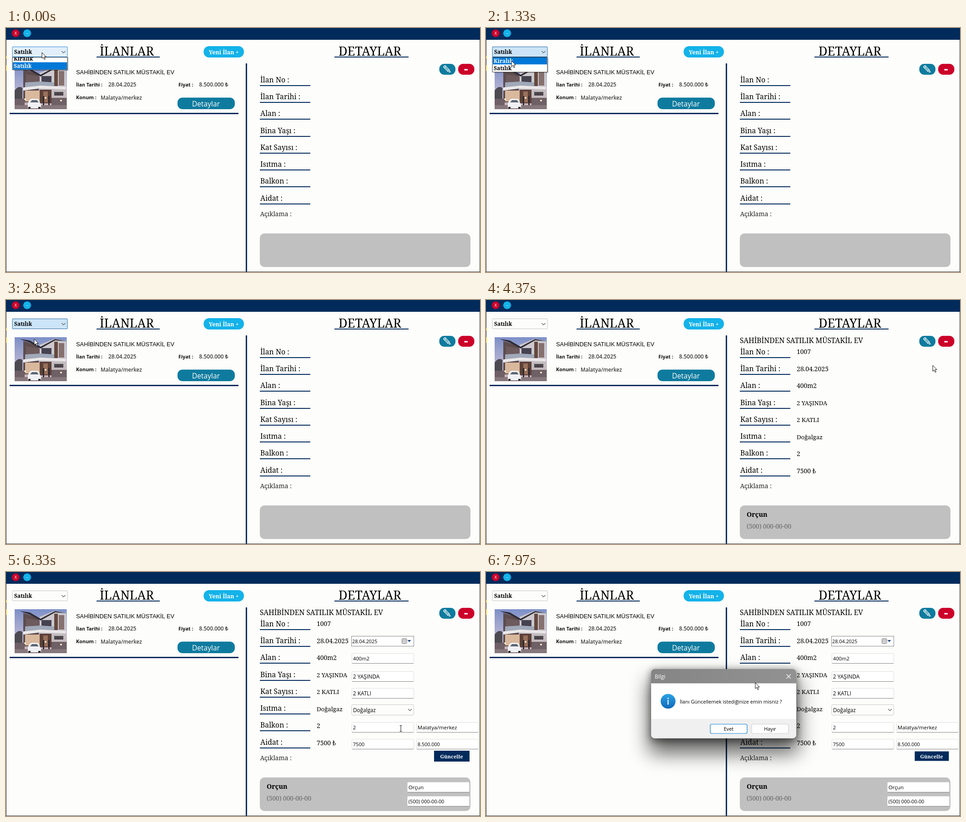
An HTML page for the animation above (8 s loop, 1042 px wide and 538 px high).

```html
<!DOCTYPE html>
<html lang="tr">
<head>
<meta charset="utf-8">
<title>İlanlar</title>
<style>
  html, body { margin: 0; width: 100%; height: 100%; overflow: hidden; background: #fdfdfb; }
  svg { display: block; }
  text { white-space: pre; }
  .serif { font-family: "Noto Serif", serif; }
  .sans { font-family: "Open Sans", "Noto Sans", sans-serif; }
  .arial { font-family: "Liberation Sans", Arial, sans-serif; }
</style>
</head>
<body>
<svg id="stage" width="1042" height="538" viewBox="0 0 1042 538" xmlns="http://www.w3.org/2000/svg">
  <defs>
    <linearGradient id="sky" x2="0" y2="1">
      <stop offset="0" stop-color="#7d90c8"/><stop offset=".6" stop-color="#b9b4d2"/><stop offset="1" stop-color="#d3b5ae"/>
    </linearGradient>
    <linearGradient id="info" x2="0" y2="1">
      <stop offset="0" stop-color="#2aa3e6"/><stop offset="1" stop-color="#0f68b8"/>
    </linearGradient>
    <linearGradient id="bar" x2="1" y2="0">
      <stop offset="0" stop-color="#858585"/><stop offset="1" stop-color="#929292"/>
    </linearGradient>
    <filter id="blur" x="-40%" y="-60%" width="180%" height="240%"><feGaussianBlur stdDeviation="22"/></filter>
    <filter id="soft" x="-20%" y="-30%" width="140%" height="180%"><feGaussianBlur stdDeviation="8"/></filter>
    <clipPath id="drop"><rect x="12" y="64" width="128" height="40"/></clipPath>
    <clipPath id="photo"><rect x="19" y="82" width="114.5" height="97"/></clipPath>
    <clipPath id="box"><rect x="363" y="214" width="319" height="152.5" rx="8"/></clipPath>
  </defs>
</svg>
<script>
const LOOP = 8000, NAVY = '#022b5c', TEAL = '#0e7b9e', RED = '#cc0029', CYAN = '#14b2e9', PAPER = '#fdfdfb';
const OWNER = 'Orçun', PHONE = '(500) 000-00-00', TITLE = 'SAHİBİNDEN SATILIK MÜSTAKİL EV';
const stage = document.getElementById('stage');

// Markup helpers
const rect = (x, y, w, h, fill, more = '') =>
  `<rect x="${x}" y="${y}" width="${w}" height="${h}" fill="${fill}" ${more}/>`;
const path = (d, fill, more = '') => `<path d="${d}" fill="${fill}" ${more}/>`;
const line = (d, color, width = 1, more = '') => path(d, 'none', `stroke="${color}" stroke-width="${width}" ${more}`);
const text = (x, y, s, size, { font = 'serif', fill = '#000', weight = 400, anchor = 'start' } = {}) =>
  `<text x="${x}" y="${y}" class="${font}" font-size="${size}" font-weight="${weight}" fill="${fill}" text-anchor="${anchor}">${s}</text>`;
const group = (id, body, more = '') => `<g id="${id}" ${more}>${body}</g>`;
const chevron = (x, y) => line(`M${x - 4} ${y - 2}l4 4 4-4`, '#555', 1.1);

// Left column
const bold = { font: 'sans', weight: 700, fill: '#111' };
const semi = { font: 'sans', weight: 600, fill: '#3a3a3a' };

const house = `<g clip-path="url(#photo)">` +
  rect(19, 82, 115, 97, 'url(#sky)') +
  path('M19 138q8-12 17-6v36H19z', '#4d4a52') +
  path('M38 90l34 12v62H38z', '#5d4d4f') +
  path('M44 102l36 6 20-2v22H44z', '#6d5a5c') +
  path('M74 99l34-14 24 6v62H74z', '#cdc9cf') +
  path('M30 86l22 3 24 14 32-17 24 5-24-2-32 18-24-13z', '#302b33') +
  path('M106 92h8v36h-8z', '#64493f') +
  path('M116 95h12v32h-12z', '#85716f') +
  path('M78 106h22v17H78z', '#45434f') +
  path('M42 120l34-2 30 2v9l-30-1-34 4z', '#9fa9b9') +
  path('M38 131l38-4 56 3v5l-56-2-38 5z', '#ece7e8') +
  path('M42 138h32v24H42z', '#d9b99d') +
  path('M74 136h26v30H74z', '#5c4139') +
  path('M82 140h10v24H82z', '#99705a') +
  path('M100 136h34v18h-34z', '#c3bbbd') +
  path('M106 141h20v8h-20z', '#4c454b') +
  path('M100 154h34v16h-34zM19 156h22v14H19z', '#6f6066') +
  path('M81 150h3v26h-3zM93 150h3v26h-3z', '#2f2a31') +
  path('M19 170h115v9H19z', '#85777c') +
  path('M48 167q2-10 9-11h11q6 1 7 10l2 2v9H48z', '#eef0f3') +
  path('M53 164l4-5h11l4 5z', '#5c6573') +
  path('M49 174h5v4h-5zM71 174h5v4h-5z', '#2b292f') +
  [[42, 157], [87, 154], [121, 160]].map(([x, y]) => `<circle cx="${x}" cy="${y}" r="2" fill="#fff0d0"/>`).join('') +
  '</g>';

const listing = house +
  text(154, 101.5, TITLE, 12.85, { font: 'arial' }) +
  text(154, 128.5, 'İlan Tarihi :', 10.5, bold) + text(225, 129, '28.04.2025', 12, semi) +
  text(379, 128.5, 'Fiyat :', 10.9, bold) + text(424.5, 129, '8.500.000 ₺', 11.9, semi) +
  text(154, 157, 'Konum :', 10.9, bold) + text(208, 158, 'Malatya/merkez', 11.6, semi) +
  rect(377, 153.5, 126, 25.5, TEAL, 'rx="11"') +
  text(439.5, 172.5, 'Detaylar', 15.6, { font: 'sans', fill: '#fff', anchor: 'middle' }) +
  rect(8, 187, 503, 3, NAVY);

// Right column
const rows = [
  ['İlan No :', 120, '1007', 13.8], ['İlan Tarihi :', 157, '28.04.2025', 14.1],
  ['Alan :', 194, '400m2', 13.8], ['Bina Yaşı :', 232, '2 YAŞINDA', 13],
  ['Kat Sayısı :', 269, '2 KATLI', 13.1], ['Isıtma :', 306, 'Doğalgaz', 13.2],
  ['Balkon :', 343, '2', 13.8], ['Aidat :', 381, '7500 ₺', 13.8]
];
const labels = rows.map(([s, y]) => text(559, y, s, 15.8) + rect(558, y + 6, 111, 2, NAVY)).join('');
const values = rows.map(([, , s, size], i) => text(683, Math.floor(119.8 + 37.5 * i), s, size)).join('') +
  text(558, 94.5, TITLE, 15.65) +
  text(573, 478, OWNER, 14.4, { weight: 700 }) +
  text(573, 504, PHONE, 13.7, { fill: '#666' });

const pencil = line('M-9-2.5h13l6 2.5-6 2.5h-13zM-6-2.5v5M4-2.5v5M-6 0h10', '#fff', 1.2,
  'stroke-linejoin="round" transform="translate(969.5 90.5) rotate(45)"');

const base = rect(0, 0, 1042, 538, PAPER) +
  rect(0, 0, 1042, 26, NAVY) +
  `<circle cx="21.3" cy="11.5" r="8.6" fill="${RED}"/><circle cx="46.5" cy="11.5" r="8.6" fill="${CYAN}"/>` +
  text(21.3, 15, 'X', 9.5, { font: 'sans', fill: '#fff', anchor: 'middle' }) +
  text(46.5, 15, '-', 10, { font: 'sans', fill: '#fff', anchor: 'middle' }) +
  text(206, 61, 'İLANLAR', 26.8) + rect(199, 63, 139, 2, NAVY) +
  text(731, 61, 'DETAYLAR', 26.8) + rect(722, 63, 163, 2, NAVY) +
  rect(434.5, 40, 88.5, 25, CYAN, 'rx="12"') +
  text(478.7, 57.5, 'Yeni İlan +', 12.4, { weight: 700, fill: '#fff', anchor: 'middle' }) +
  rect(527, 78, 3, 460, NAVY) + listing + labels +
  text(558.5, 414.5, 'Açıklama :', 13.9, { fill: '#222' }) +
  rect(558, 453, 463, 74, '#c0c0c0', 'rx="10"') +
  rect(952.5, 79, 35.5, 24, TEAL, 'rx="11"') + pencil +
  rect(994, 79, 35.5, 24, RED, 'rx="11"') + rect(1007.5, 90.5, 7.5, 3, '#fff') +
  rect(0, 26, 1, 512, '#3c3c3c') + rect(0, 62, 1.5, 5, '#f2d21c') + rect(0, 82, 1.5, 13, '#f2d21c') +
  rect(1041, 26, 1, 512, '#555') + rect(0, 537, 1042, 1, '#444');

// Edit form
const inputs = [
  [760, 179, '400m2', 11.2], [760, 219, '2 YAŞINDA', 12], [760, 256, '2 KATLI', 11.9],
  [760, 331, '2', 11], [760, 368, '7500', 11],
  [902, 331, 'Malatya/merkez', 11.6], [902, 368, '8.500.000', 10.8],
  [882, 463, OWNER, 11.6], [882, 494, PHONE, 10.9]
];
const W = 137, H = 23;
const field = { font: 'sans' };
const form = inputs.map(([x, y, s, size]) =>
  rect(x + .5, y + .5, W - 1, H - 1, '#fff', 'rx="2" stroke="#dedede"') +
  rect(x + 1, y + H - 1, W - 2, 1, '#858585') +
  text(x + 2.8, y + 16, s, size, field)).join('') +
  rect(759.5, 141.5, 137, 22, '#fff', 'stroke="#858585"') +
  text(761, 156.7, '28.04.2025', 10.8, field) +
  rect(870.5, 147, 10.5, 10.5, '#f0f0f0', 'rx="1.5" stroke="#666"') +
  line('M871 150h10M871 153h10M874 147v10M877.5 147v10', '#999', .8) +
  path('M882.5 150h8l-4 4.5z', '#24477c') +
  rect(760, 292.5, 136.5, 23, PAPER, 'rx="2" stroke="#c9c9c9"') +
  text(763, 308.5, 'Doğalgaz', 11.7, field) + chevron(888, 304);

const update = rect(941, 394, 78, 24, NAVY, 'id="plate"') +
  text(979.5, 410.7, 'Güncelle', 11.2, { weight: 700, fill: '#fff', anchor: 'middle' });

// Type filter and its list
const combo = rect(14, 41.5, 121, 22, PAPER, 'id="frame" rx="1"') +
  text(18, 57.3, 'Satılık', 12, { weight: 700 }) + chevron(126.5, 53);
const option = (id, y, s) => rect(15, y, 119, 16, '#fff', `id="${id}"`) +
  text(17, y + 12.3, s, 12, { weight: 700 }).replace('<text', `<text id="${id}Text"`);
const list = '<g clip-path="url(#drop)">' + group('slide',
  rect(17, 66, 120, 33, '#000', 'opacity=".25"') +
  rect(14, 64, 121, 33, '#fff', 'stroke="#333"') +
  option('rent', 64.5, 'Kiralık') + option('sale', 80.5, 'Satılık')) +
  rect(14, 64, 121, 1, '#333') + '</g>';

// Confirmation box
const button = (x, s, color) => rect(x, 335.5, 81, 20.5, '#fdfdfd', `rx="3" stroke="${color}" stroke-width="1.2"`) +
  text(x + 40.5, 350, s, 10.8, { font: 'sans', anchor: 'middle' });
const dialog =
  rect(358, 236, 329, 164, '#000', 'rx="10" opacity=".6" filter="url(#blur)"') +
  rect(362, 216, 321, 156, '#000', 'rx="8" opacity=".45" filter="url(#soft)"') +
  '<g clip-path="url(#box)">' + rect(363, 214, 319, 153, '#fff') +
  rect(363, 214, 319, 31.5, 'url(#bar)') + rect(363, 324, 319, 43, '#f0f0f0') + '</g>' +
  text(371, 234.5, 'Bilgi', 11.9, { font: 'sans', fill: '#fff' }) +
  line('M660.5 225.5l9.5 9.5m0-9.5l-9.5 9.5', '#fff', 1.1) +
  '<circle cx="400.3" cy="285" r="16.3" fill="url(#info)"/>' +
  '<circle cx="400.3" cy="278.5" r="1.5" fill="#fff"/>' + rect(399.2, 282, 2.2, 10.5, '#fff') +
  text(426, 290, 'İlanı Güncellemek istediğinize emin misniz ?', 11.05, { font: 'sans' }) +
  button(493, 'Evet', '#1683d8') + button(584, 'Hayır', '#d2d2d2');

const pointer =
  group('arrow', path('M0 0V13.2L3 10.4 5.3 15.5 7.4 14.6 5.2 9.6H9.2Z', '#fff', 'stroke="#111" stroke-linejoin="round"')) +
  group('beam', line('M-2.5-6.5h2l.5.5.5-.5h2M0-6V6M-2.5 6.5h2l.5-.5.5.5h2', '#222', 1.1)) +
  group('busy', '<circle r="6.2" fill="#fff" stroke="#1f8fe6" stroke-width="3.6"/>' +
    line('M0-6.2A6.2 6.2 0 0 1 6.2 0', '#6fc0f5', 3.6, 'id="arc"'));

stage.insertAdjacentHTML('beforeend', base + group('values', values) + group('form', form) +
  group('update', update) + combo + group('list', list) + group('dialog', dialog) + group('pointer', pointer));

// Motion: time, x, y
const moves = [
  [0, 79, 54], [250, 79, 54], [800, 60, 68], [1150, 56, 72], [1500, 56, 72], [1950, 62, 86],
  [2850, 62, 86], [3400, 432, 166], [3750, 436, 168], [4330, 982, 144], [4400, 982, 144],
  [4620, 970, 93], [4800, 970, 93], [5210, 895, 188], [5300, 895, 188], [5750, 852, 268],
  [6250, 862, 342], [6750, 948, 378], [7150, 981, 412], [7620, 981, 412], [7960, 592, 244], [8000, 592, 244]
];
const at = { pick: 2300, details: 3620, edit: 4720, press: 7380, ask: 7620 };
const el = id => document.getElementById(id);
const set = (id, attrs) => { for (const k in attrs) el(id).setAttribute(k, attrs[k]); };
const show = (id, on) => set(id, { display: on ? 'inline' : 'none' });
const clamp = v => Math.max(0, Math.min(1, v));

function place(t) {
  const i = Math.max(1, moves.findIndex(m => m[0] > t));
  const [t0, x0, y0] = moves[i - 1], [t1, x1, y1] = moves[i];
  const p = (t - t0) / (t1 - t0), e = p * p * (3 - 2 * p);
  return [x0 + (x1 - x0) * e, y0 + (y1 - y0) * e];
}

function draw(t) {
  const [x, y] = place(t);
  const editing = t >= at.edit, asking = t >= at.ask, busy = t >= at.press && !asking;

  // Filter list drops open, follows the pointer, then closes
  const hot = y > 64 && y < 80.5 ? 'rent' : 'sale';
  show('list', t < at.pick);
  set('slide', { transform: `translate(0 ${-5 * (1 - clamp(t / 70))})` });
  for (const id of ['rent', 'sale']) {
    set(id, { fill: id === hot ? '#0078d7' : '#fff' });
    set(id + 'Text', { fill: id === hot ? '#fff' : '#000' });
  }
  const focus = t < at.details;
  set('frame', {
    fill: !focus ? PAPER : t < 100 ? '#e2effa' : '#cce4f7',
    stroke: !focus ? '#c6c6c6' : t < 100 ? '#2a86cf' : '#2a6aa5'
  });

  show('values', t >= at.details);
  show('form', editing);
  show('update', editing && !busy);
  const d = asking ? 1.5 : 0;
  set('plate', { x: 941 + d, y: 394 + d, width: 78 - 2 * d, height: 24 - 2 * d });

  const k = clamp((t - at.ask) / 130), s = .94 + .06 * k;
  show('dialog', asking);
  set('dialog', { opacity: k, transform: `translate(522.5 290) scale(${s}) translate(-522.5 -290)` });

  const typing = editing && !asking && inputs.some(([l, top]) => x >= l && x <= l + W && y >= top && y <= top + H);
  set('pointer', { transform: `translate(${Math.round(x)} ${Math.round(y)})` });
  show('busy', busy);
  show('beam', typing && !busy);
  show('arrow', !typing && !busy);
  set('arc', { transform: `rotate(${t * .4 % 360})` });
}

const start = performance.now();
function tick() {
  draw((performance.now() - start) % LOOP);
  requestAnimationFrame(tick);
}
draw(0);
requestAnimationFrame(tick);
</script>
</body>
</html>
```
